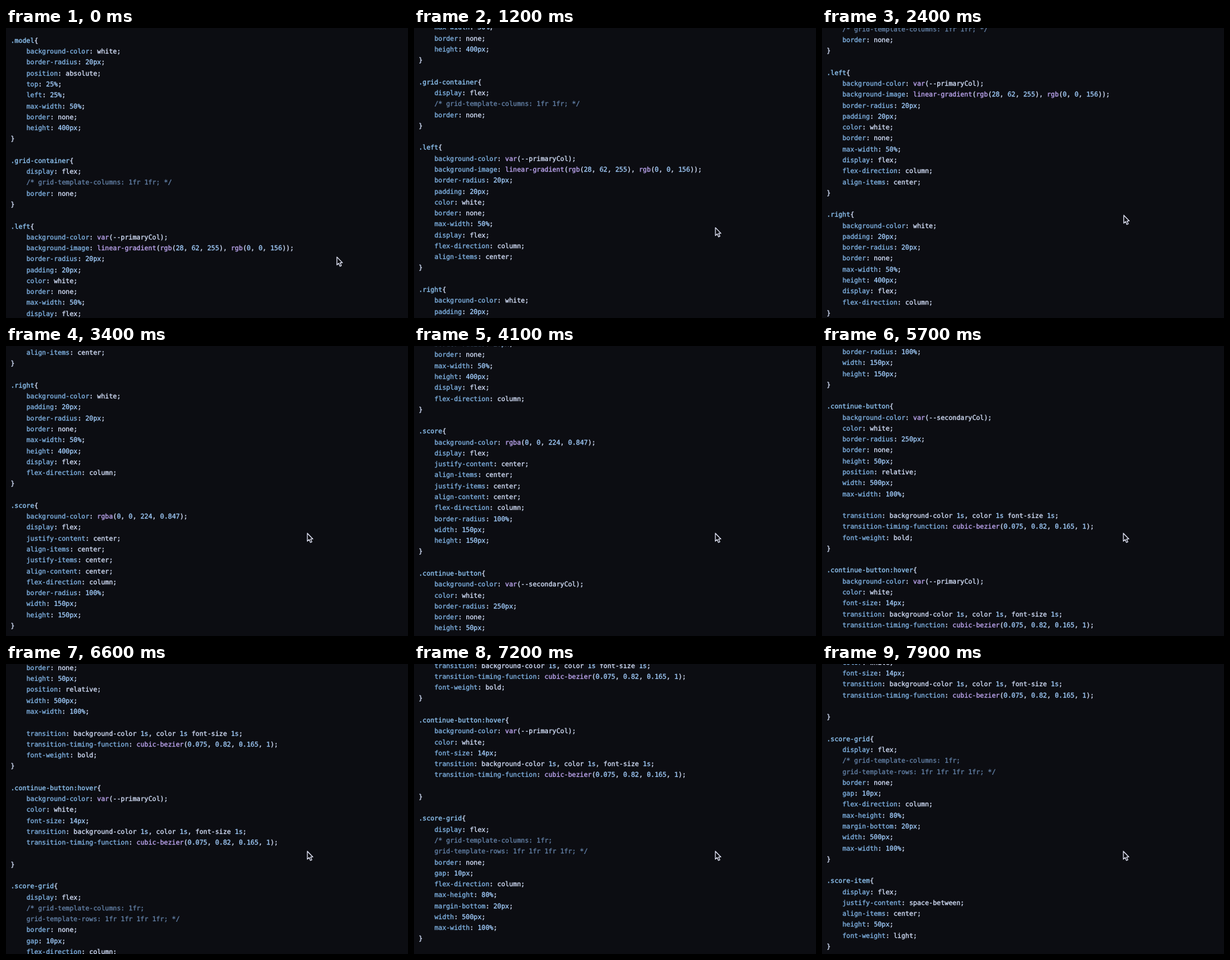
Recreate the animation shown at these times as an HTML page. Size 600 px wide and 432 px high, loop 8000 ms.

```html
<!DOCTYPE html>
<html lang="en">
<head>
<meta charset="utf-8">
<title>Stylesheet scroll</title>
<style>
  html, body { margin: 0; width: 100%; height: 100%; overflow: hidden; background: #0c0d12; }
  svg { display: block; width: 100vw; height: 100vh; }
  text {
    font: 9.76px "DejaVu Sans Mono", monospace;
    white-space: pre;
    text-rendering: geometricPrecision;
    color: #d6e2fc;
  }
  text, tspan { fill: currentColor; stroke: currentColor; stroke-width: 0.3px; }
  .selector { color: #93cafa; }
  .property { color: #82b6e8; }
  .number { color: #a3cfff; }
  .function { color: #c0a9f4; }
  .comment { color: #6482a8; }
</style>
</head>
<body>
<svg id="stage" viewBox="0 0 600 432">
  <g id="code"></g>
  <path id="cursor" d="M0 0V11.8L2.7 9.3L4.6 13.7L6.7 12.8L4.8 8.5H8.2Z"
        fill="#0b0b0f" stroke="#dcdff0" stroke-width="1.2" stroke-linejoin="round"/>
</svg>
<script>
const SOURCE = `.model{
    background-color: white;
    border-radius: 20px;
    position: absolute;
    top: 25%;
    left: 25%;
    max-width: 50%;
    border: none;
    height: 400px;
}

.grid-container{
    display: flex;
    /* grid-template-columns: 1fr 1fr; */
    border: none;
}

.left{
    background-color: var(--primaryCol);
    background-image: linear-gradient(rgb(28, 62, 255), rgb(0, 0, 156));
    border-radius: 20px;
    padding: 20px;
    color: white;
    border: none;
    max-width: 50%;
    display: flex;
    flex-direction: column;
    align-items: center;
}

.right{
    background-color: white;
    padding: 20px;
    border-radius: 20px;
    border: none;
    max-width: 50%;
    height: 400px;
    display: flex;
    flex-direction: column;
}

.score{
    background-color: rgba(0, 0, 224, 0.847);
    display: flex;
    justify-content: center;
    align-items: center;
    justify-items: center;
    align-content: center;
    flex-direction: column;
    border-radius: 100%;
    width: 150px;
    height: 150px;
}

.continue-button{
    background-color: var(--secondaryCol);
    color: white;
    border-radius: 250px;
    border: none;
    height: 50px;
    position: relative;
    width: 500px;
    max-width: 100%;

    transition: background-color 1s, color 1s font-size 1s;
    transition-timing-function: cubic-bezier(0.075, 0.82, 0.165, 1);
    font-weight: bold;
}

.continue-button:hover{
    background-color: var(--primaryCol);
    color: white;
    font-size: 14px;
    transition: background-color 1s, color 1s, font-size 1s;
    transition-timing-function: cubic-bezier(0.075, 0.82, 0.165, 1);

}

.score-grid{
    display: flex;
    /* grid-template-columns: 1fr;
    grid-template-rows: 1fr 1fr 1fr 1fr; */
    border: none;
    gap: 10px;
    flex-direction: column;
    max-height: 80%;
    margin-bottom: 20px;
    width: 500px;
    max-width: 100%;
}

.score-item{
    display: flex;
    justify-content: space-between;
    align-items: center;
    height: 50px;
    font-weight: light;
}`;

const LOOP = 8000, STEP = 100;
const LEFT = 6.9, INDENT = 23.5, BASELINE = 21.9, LINE = 16.273;

// [time, scroll offset]
const SCROLL = [[500, 0], [1200, 117.1], [2400, 228.7], [3400, 448.2],
                [4800, 661.5], [6600, 956.8], [7900, 1176.4]];
// [time, x, y], held until the next entry
const CURSOR = [[0, 493.9, 341.2], [100, 464, 311.4], [200, 449.9, 297.4],
                [1400, 450.2, 287.4], [1500, 450.4, 279], [2500, 449.8, 279]];

const span = (kind, text) => `<tspan class="${kind}">${text}</tspan>`;

function highlight(line) {
  if (/\/\*|\*\//.test(line)) return span("comment", line);
  if (line.endsWith("{")) return span("selector", line.slice(0, -1)) + "{";
  const colon = line.indexOf(":");
  if (colon < 0) return line;
  const value = line.slice(colon).replace(
    /([a-z-]+)(?=\()|\b\d[\d.]*(?:px|%|s)?/g,
    (token, name) => span(name ? "function" : "number", token));
  return span("property", line.slice(0, colon)) + value;
}

const code = document.getElementById("code");
const cursor = document.getElementById("cursor");
code.innerHTML = SOURCE.split("\n").map((line, i) => {
  const x = LEFT + (line.startsWith(" ") ? INDENT : 0);
  return `<text x="${x}" y="${BASELINE + i * LINE}">${highlight(line.trim())}</text>`;
}).join("");

const slopes = SCROLL.slice(1).map(([t, y], i) => (y - SCROLL[i][1]) / (t - SCROLL[i][0]));
const tangents = SCROLL.map((_, i) => {
  if (i === 0) return slopes[0] * 0.6;
  if (i === slopes.length) return slopes[i - 1];
  return 2 * slopes[i - 1] * slopes[i] / (slopes[i - 1] + slopes[i]);
});

// Monotone cubic through the scroll points
function scrollAt(time) {
  if (time <= SCROLL[0][0]) return 0;
  const end = SCROLL.findIndex(([t]) => time <= t);
  if (end < 0) return SCROLL[SCROLL.length - 1][1];
  const [t0, y0] = SCROLL[end - 1], [t1, y1] = SCROLL[end];
  const d = t1 - t0, u = (time - t0) / d, v = 1 - u;
  return y0 * (1 + 2 * u) * v * v + y1 * u * u * (3 - 2 * u)
       + d * u * v * (tangents[end - 1] * v - tangents[end] * u);
}

const start = performance.now();
function draw() {
  const elapsed = (performance.now() - start) % LOOP;
  const time = Math.floor(elapsed / STEP) * STEP;
  const [, x, y] = CURSOR.filter(([t]) => t <= time).pop();
  code.setAttribute("transform", `translate(0 ${-scrollAt(time)})`);
  cursor.setAttribute("transform", `translate(${x} ${y})`);
  requestAnimationFrame(draw);
}
draw();
</script>
</body>
</html>
```
